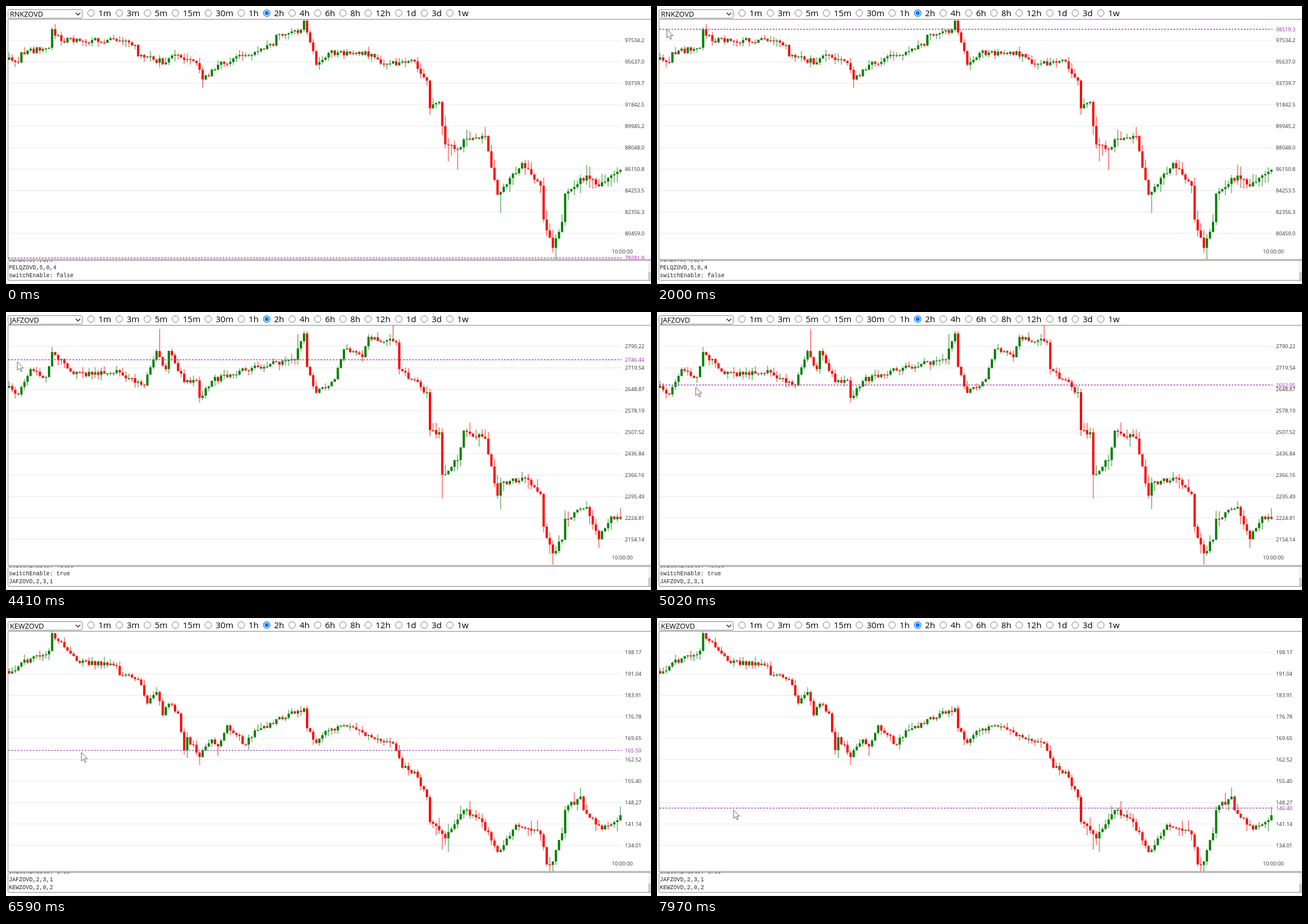
An HTML page that plays this animation: 1138x492 px, repeating every 8000 ms.

```html
<!DOCTYPE html>
<html lang="en">
<head>
<meta charset="utf-8">
<title>Candlestick chart</title>
<style>
  html, body { margin: 0; width: 100%; height: 100%; overflow: hidden; background: #fff; }
  svg { display: block; }
  text { white-space: pre; }
  .ui { font: 15px "Open Sans", "Noto Sans", sans-serif; fill: #000; }
  .pick { font: 12.6px "Open Sans", "Noto Sans", sans-serif; }
  .axis { font: 9.3px "Open Sans", "Noto Sans", sans-serif; fill: #333; }
  .log { font: 10px "Liberation Mono", monospace; fill: #222; }
  .box { fill: none; stroke: #858585; }
</style>
</head>
<body>
<svg id="stage" width="1138" height="492" viewBox="0 0 1138 492">
  <clipPath id="plotClip"><rect x="4" y="24" width="1134" height="424"/></clipPath>
  <clipPath id="logClip"><rect x="4" y="451" width="1130" height="35"/></clipPath>
  <rect class="box" x="3.5" y="6.5" width="131" height="15" rx="2"/>
  <text id="pick" class="ui pick" x="7" y="18.5"></text>
  <path d="M123 12l4 4 4-4" fill="none" stroke="#222" stroke-width="1.4"/>
  <g id="radios"></g>
  <g id="plot" clip-path="url(#plotClip)"></g>
  <path class="box" d="M1138 23.5H3.5V448.5H1138"/>
  <rect x="1133" y="451" width="5" height="34" fill="#f1f1f1"/>
  <rect x="1133" y="470" width="5" height="15" fill="#cdcdcd"/>
  <rect class="box" x="3.5" y="450.5" width="1140" height="35" rx="2"/>
  <g id="log" clip-path="url(#logClip)"></g>
  <path d="M0 491.5H1138" stroke="#ececec"/>
  <path id="cursor" d="M0 0V15L3.6 11.8 6.2 17.4 8.4 16.4 5.9 11H10.8Z" fill="#fff" stroke="#5b4a50" stroke-width=".9"/>
</svg>
<script>
const LOOP = 8000, TICK = 66, LAG = 35, CANDLES = 200;
const GRID_Y = 61, GRID_GAP = 37.94, RIGHT = 1086;

const $ = id => document.getElementById(id);
function add(parent, tag, attrs, text) {
  const el = document.createElementNS('http://www.w3.org/2000/svg', tag);
  for (const k in attrs) el.setAttribute(k, attrs[k]);
  if (text) el.textContent = text;
  return parent.appendChild(el);
}
const noise = n => { const v = Math.sin(n * 127.1) * 43758.5453; return v - Math.floor(v); };
const priceAt = (c, y) => (c.top - (y - GRID_Y) / GRID_GAP * c.step).toFixed(c.digits);

// closing heights: turning points (index, y) joined by a jittered line
function closes(turns, seed) {
  const out = [];
  for (let k = 0; k < turns.length; k += 2) {
    const [i0, y0, i1 = i0 + 1, y1] = turns.slice(k, k + 4);
    out[i0] = y0;
    for (let i = i0 + 1; i < i1; i++)
      out[i] = y0 + (y1 - y0) * (i - i0) / (i1 - i0) + (noise(i + seed) - .5) * 10;
  }
  return out;
}

function buildChart(c, turns, spikes) {
  const g = c.node = add($('plot'), 'g', {});
  for (let k = 0; k < 10; k++) {
    const y = GRID_Y + GRID_GAP * k;
    add(g, 'path', { d: `M4 ${y}H${RIGHT}`, stroke: '#ebebeb', 'stroke-width': 1.2 });
    add(g, 'text', { class: 'axis', x: 1092, y: y + 3.3 }, priceAt(c, y));
  }
  const wicks = { green: '', red: '' }, bodies = { green: '', red: '' };
  const ys = closes(turns, c.seed);
  let open = c.open;
  for (let i = 0; i < CANDLES; i++) {
    const close = ys[i], x = 5.5 + 5.42 * i, ink = close <= open ? 'green' : 'red';
    const top = Math.min(open, close), low = Math.max(open, close, top + 1.5);
    const wild = i > 135 ? 16 : 9;
    const reach = s => noise(i * 2 + s + c.seed * 7) ** 2 * wild + 1;
    const tip = spikes[i] ?? top;
    wicks[ink] += `M${x} ${Math.min(top - reach(0), tip)}V${Math.max(low + reach(1), tip)}`;
    bodies[ink] += `M${x} ${top}V${low}`;
    open = close;
  }
  for (const ink of ['green', 'red']) {
    add(g, 'path', { d: wicks[ink], stroke: ink, 'stroke-width': 1.8, opacity: .52 });
    add(g, 'path', { d: bodies[ink], stroke: ink, 'stroke-width': 4 });
  }
  return c;
}

const first = buildChart(
  { name: 'RNKZOVD', from: 0, top: 97534.2, step: 1897.24, digits: 1, open: 95, seed: 900 },
  [0,91, 3,100, 4,82, 13,74, 14,41, 17,62, 32,60, 41,69, 42,89, 51,100, 54,86, 61,101, 63,130,
    68,104, 86,70, 87,51, 95,42, 96,26, 100,104, 104,83, 118,85, 121,102, 127,100, 132,98, 136,132,
    137,181, 140,170, 142,245, 147,250, 148,236, 155,230, 159,334, 167,278, 173,318, 174,378,
    177,428, 180,382, 181,332, 188,300, 192,319, 199,290],
  { 63: 145, 143: 275, 146: 290, 160: 366, 178: 448, 188: 281 });

const second = buildChart(
  { name: 'JAFZOVD', from: 3880, top: 2790.22, step: 70.676, digits: 2, open: 134, seed: 3300 },
  [0,131, 3,146, 7,101, 12,115, 14,71, 21,110, 36,107, 44,130, 48,69, 51,101, 52,69, 57,124, 61,121,
    62,152, 66,122, 75,104, 93,84, 96,38, 97,97, 100,143, 106,119, 109,66, 115,80, 117,44, 126,54,
    127,101, 136,142, 137,209, 140,213, 141,288, 146,262, 148,210, 155,224, 159,325, 160,302,
    168,294, 173,322, 174,380, 177,427, 180,403, 181,366, 188,345, 192,402, 196,362, 199,366],
  { 49: 30, 94: 39, 125: 24, 141: 330, 160: 349, 177: 447 });

const third = buildChart(
  { name: 'KEWZOVD', from: 6330, top: 198.17, step: 7.129, digits: 2, open: 94, seed: 6900 },
  [0,98, 4,79, 13,58, 14,27, 22,76, 35,85, 36,101, 42,109, 45,151, 48,131, 50,172, 52,152, 55,169,
    57,234, 58,211, 62,246, 66,215, 68,227, 71,190, 77,224, 80,199, 96,160, 97,195, 100,221,
    103,200, 109,190, 125,222, 128,265, 132,272, 136,317, 137,361, 142,390, 148,340, 154,361,
    159,414, 165,366, 173,383, 175,436, 177,431, 180,381, 181,340, 186,316, 187,340, 193,374, 199,349],
  { 58: 248, 62: 260, 68: 244, 141: 410, 143: 414, 176: 448 });

const charts = [first, second, third];

const radios = { '1m': 150, '3m': 200, '5m': 249.5, '15m': 299, '30m': 357, '1h': 415, '2h': 460,
  '4h': 505, '6h': 550, '8h': 594.5, '12h': 639, '1d': 693, '3d': 738, '1w': 783 };
for (const [label, x] of Object.entries(radios)) {
  const on = label === '2h', r = $('radios');
  add(r, 'circle', { cx: x, cy: 12.5, r: 5.8, fill: '#fff', stroke: on ? '#0075ff' : '#767676', 'stroke-width': on ? 1.3 : 1 });
  if (on) add(r, 'circle', { cx: x, cy: 12.5, r: 3.7, fill: '#0075ff' });
  add(r, 'text', { class: 'ui', x: x + 13, y: 18 }, label);
}

add($('plot'), 'text', { class: 'axis', x: 1069, y: 438 }, '10:00:00');
const hair = add($('plot'), 'path', { d: `M4 0H${RIGHT}`, stroke: '#a23fa8', 'stroke-width': 1.4, 'stroke-dasharray': '3 2.4' });
const tag = add($('plot'), 'text', { class: 'axis', x: 1092, style: 'fill:#982ba0' });
const rows = [452, 466, 480].map(y => add($('log'), 'text', { class: 'log', x: 5, y }));

const logLines = ['WIRZOVD,4,1,0', 'PELQZOVD,5,0,4', 'switchEnable: false',
  'switchEnable: true', 'JAFZOVD,2,3,1', 'KEWZOVD,2,0,2'];
const logTimes = [2470, second.from, third.from];

// spans in which the pointer is moving
const spans = [[0, 0], [130, 890], [960, 1720], [1790, 2200], [2800, 3540], [3610, 4140],
  [4410, 5150], [5220, 5980], [6040, 6790], [6860, 7620], [7690, 7970]];
// time, crosshair y, pointer x
const path = [[0, 446, 190], [130, 438, 190], [890, 211, 112], [960, 198, 102], [1092, 151.4, 85],
  [1300, 85, 58], [1720, 48, 22], [2200, 36, 14], [2800, 37, 12], [3130, 50.2, 13],
  [4140, 84.5, 20], [4410, 84.5, 20], [5616, 175.5, 118], [6568, 234.4, 133],
  [7620, 313, 135], [7954, 336.5, 135], [8100, 346, 135]];

function held(t) {
  const [s, e] = spans.findLast(span => t >= span[0]);
  return s + Math.floor((Math.min(t, e) - s) / TICK) * TICK;
}
function along(t, col) {
  const k = Math.max(1, path.findIndex(p => p[0] >= t));
  const a = path[k - 1], b = path[k];
  return a[col] + (b[col] - a[col]) * (t - a[0]) / (b[0] - a[0]);
}

function draw(t) {
  const now = held(t), y = along(now, 1);
  const chart = charts.findLast(c => t >= c.from);
  charts.forEach(c => c.node.style.display = c === chart ? '' : 'none');
  $('pick').textContent = chart.name;
  hair.setAttribute('transform', `translate(0 ${y})`);
  tag.setAttribute('y', y + 3.3);
  tag.textContent = priceAt(chart, y);
  const skip = logTimes.filter(at => t >= at).length;
  rows.forEach((row, k) => row.textContent = logLines[skip + k]);
  $('cursor').style.display = t < 130 ? 'none' : '';
  $('cursor').setAttribute('transform', `translate(${along(now, 2)} ${along(now + LAG, 1) + 1})`);
}

const start = performance.now();
function frame() {
  draw((performance.now() - start) % LOOP);
  requestAnimationFrame(frame);
}
frame();
</script>
</body>
</html>
```
